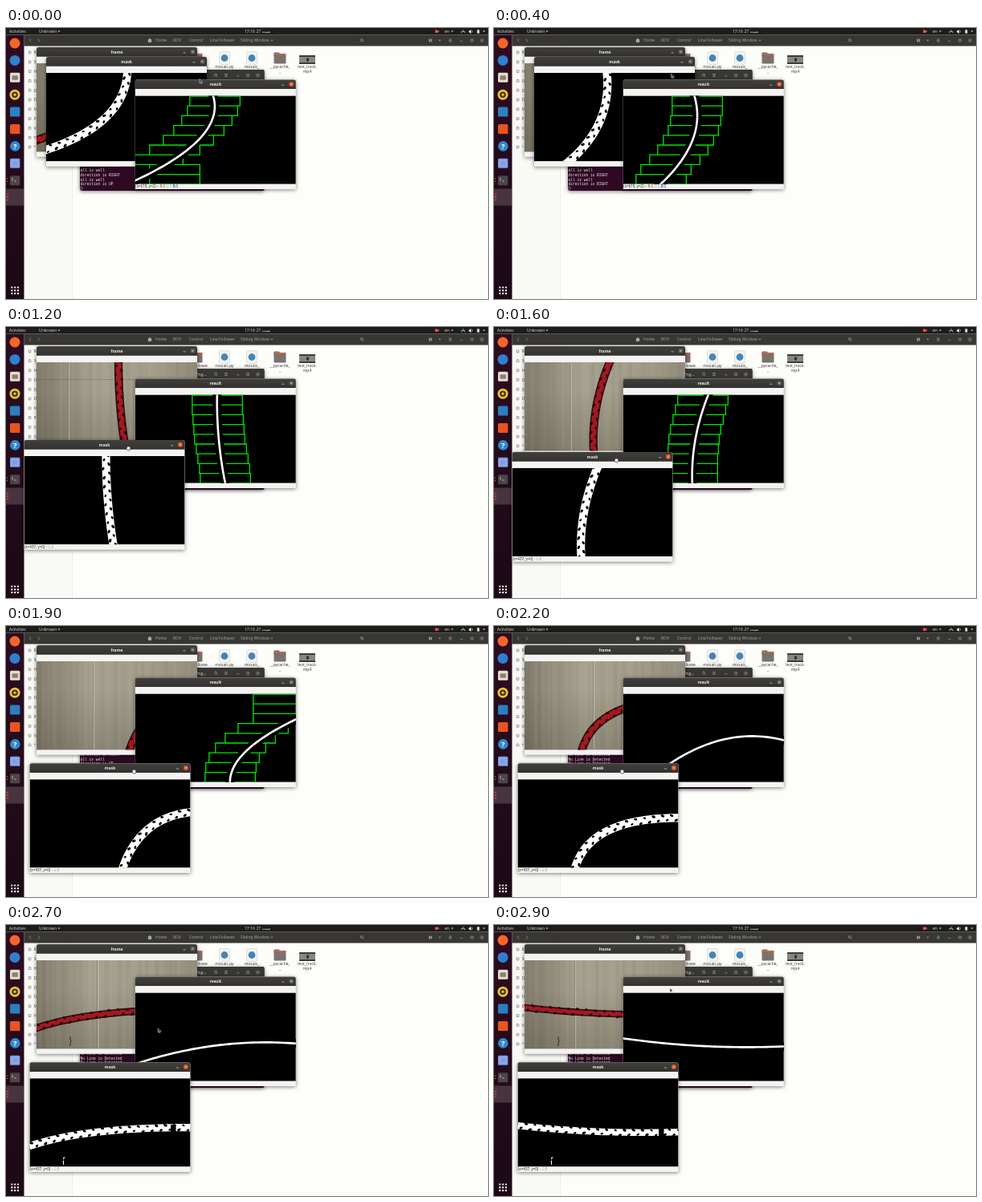
An HTML page that plays this animation: 600 by 338 pixels, repeating every 3 s.

```html
<!DOCTYPE html>
<html lang="en">
<head>
<meta charset="utf-8">
<title>Line follower</title>
<style>
html, body { margin: 0; width: 100%; height: 100%; overflow: hidden; background: #fdfefa; }
svg { display: block; }
#stage { width: 100vw; height: 100vh; }
text { font: 5px "Open Sans", "Noto Sans", sans-serif; white-space: pre; }
.mid { text-anchor: middle; }
.bar { fill: #e4e3e0; }
.dim { opacity: .65; }
.title { font-weight: 700; text-anchor: middle; fill: #eeeeec; }
.status { font: 4.5px "Noto Sans", sans-serif; fill: #222; }
.term { font: 4.57px "Liberation Mono", "DejaVu Sans Mono", monospace; fill: #f2eef0; }
.line { fill: none; stroke: #d8d7d3; stroke-width: .7; }
.shadow { filter: drop-shadow(0 1px 2.5px rgba(0,0,0,.5)); }
</style>
</head>
<body>
<svg id="stage" viewBox="0 0 600 338" preserveAspectRatio="none">
  <defs>
    <linearGradient id="dock" x2="0" y2="1"><stop stop-color="#2d0d21"/><stop offset="1" stop-color="#1b0915"/></linearGradient>
    <linearGradient id="head" x2="0" y2="1"><stop stop-color="#41403c"/><stop offset="1" stop-color="#33322f"/></linearGradient>
    <linearGradient id="wood"><stop stop-color="#817b6b"/><stop offset=".35" stop-color="#a7a18f"/><stop offset=".7" stop-color="#a39d8b"/><stop offset="1" stop-color="#918b7b"/></linearGradient>
    <linearGradient id="shade" x2="0" y2="1"><stop offset=".3" stop-color="#3a3428" stop-opacity="0"/><stop offset="1" stop-color="#3a3428" stop-opacity=".25"/></linearGradient>
  </defs>
  <g id="desk"></g>
  <g id="wins"></g>
  <g id="cursor" fill="#fff" stroke="#222" stroke-width=".7">
    <path id="hand" d="M-2 -2.2Q-1.2 -3-.6 -2.2Q.2 -3 .8 -2.2Q1.7 -2.8 2.2 -1.8L2.3 .6Q2 2.5 .3 2.6Q-1.4 2.6-2.5 .3Q-2.9 -.6-2 -.6Z"/>
    <path id="arrow" d="M0 -2.5V2.6L1.1 1.6L2 3.4L2.8 3L2 1.2H3.6Z" fill="#222" stroke="#fff" stroke-width=".5"/>
  </g>
</svg>
<script>
const LOOP = 3000, STEP = 100;
const $ = id => document.getElementById(id);
const range = n => [...Array(n).keys()];
const rect = (x, y, w, h, fill, more = '') => `<rect x="${x}" y="${y}" width="${w}" height="${h}" fill="${fill}" ${more}/>`;
const dot = (x, y, r, fill) => `<circle cx="${x}" cy="${y}" r="${r}" fill="${fill}"/>`;
const label = (x, y, s, cls = '', more = '') => `<text x="${x}" y="${y}" class="${cls}" ${more}>${s}</text>`;
const stroke = (d, more = '') => `<path d="${d}" class="line" ${more}/>`;
const minus = (x, y) => stroke(`M${x - 1.5} ${y + 1}h3`);
const cross = (x, y) => stroke(`M${x - 1.2} ${y - 1.2}l2.4 2.4m0-2.4l-2.4 2.4`);
const menu = (x, y) => stroke(`M${x - 1.7} ${y - 1.5}h3.4m-3.4 1.5h3.4m-3.4 1.5h3.4`);
const square = (x, y, more) => stroke(`M${x - 1.4} ${y - 1.4}h2.8v2.8h-2.8z`, more);
const lens = (x, y) => stroke(`M${x + .9} ${y + .9}l1.4 1.4M${x - 1.6} ${y}a1.5 1.5 0 1 0 3 0a1.5 1.5 0 1 0-3 0`);
const caret = (x, y) => `<path d="M${x - 1.4} ${y - .8}h2.8l-1.4 1.7z" class="bar"/>`;
const closer = (x, y) => dot(x, y, 2.9, '#5a5955') + cross(x, y);

function rng(seed) {
  return () => (seed = (seed * 16807) % 2147483647) / 2147483647;
}

function topBar() {
  return rect(0, 0, 600, 8.5, '#1d1c1b') +
    label(4, 6, 'Activities', 'bar') + label(41, 6, 'Unknown', 'bar') + caret(66, 4.3) +
    label(297, 6, '17:16', 'bar') + label(311.5, 6, '27', 'bar') +
    label(318.5, 6, 'سبت', 'bar', 'style="font-family:DejaVu Sans,sans-serif"') +
    rect(534, 2.4, 3.6, 3.6, '#e8524a', 'rx=".8"') + rect(537.4, 3.1, 1.6, 2.2, '#e8524a') +
    label(546, 6, 'en', 'bar') + caret(555.5, 4.3) +
    stroke('M569 2.2v2m-2 2.2v-2h4v2') +
    '<path d="M576 3.4h1.2l1.8-1.5v5l-1.8-1.5h-1.2z" class="bar"/>' + stroke('M580 3q1.2 1.4 0 2.8') +
    rect(586.5, 2.3, 2.8, 4.4, '#e4e3e0', 'rx=".5"') + caret(595, 4.3);
}

function dock() {
  const y = i => 19 + i * 21.4;
  const tile = (i, fill) => rect(5, y(i) - 6, 12.4, 12, fill, 'rx="1.5"');
  return rect(0, 8.5, 22.5, 329.5, 'url(#dock)') + rect(0, 200.5, 22, 21, '#47343f') +
    dot(11, y(0), 6.5, '#f5652a') + dot(11, y(1), 6.5, '#2f7fd0') +
    tile(2, '#e6ddcf') + rect(7.5, y(2) - 2.5, 7.4, 5.5, '#8a7f74', 'rx="1"') +
    dot(11, y(3), 6.5, '#f4c431') + dot(11, y(3), 3.8, '#39332c') + dot(11, y(3), 1.6, '#f4c431') +
    tile(4, '#2c7fc0') + tile(5, '#e95420') +
    dot(11.3, y(6), 6.3, '#2f8acb') + label(11.3, y(6) + 3.4, '?', 'mid', 'fill="#fff" style="font-size:9.5px;font-weight:700"') +
    tile(7, '#7d9ce8') + stroke(`M7.5 ${y(7) - 3.5}h7.4v7h-7.4z`, 'stroke-dasharray="1.4 1"') +
    tile(8, '#4a4647') + stroke(`M7 ${y(8) - 3}l2 1.6l-2 1.6m3 .6h3`) +
    [188, 191.5].map(cy => dot(1.6, cy, .8, '#e95420')).join('') +
    [207.5, 211, 214.5].map(cy => dot(2, cy, 1, '#ff3a2d')).join('') +
    range(9).map(i => rect(6.2 + i % 3 * 3.8, 322.4 + Math.floor(i / 3) * 3.8, 2.2, 2.2, '#f1eef0', 'rx=".6"')).join('');
}

function header() {
  let s = stroke('M31 13.5l-1.8 2l1.8 2M40 13.5l1.8 2l-1.8 2');
  s += '<path d="M176 15.5l3-2.8l3 2.8h-1v2.5h-4v-2.5z" class="bar"/>';
  [[186, 'Home'], [208, 'ROV'], [228, 'Control'], [254, 'Line Follower'], [292, 'Sliding Window']]
    .forEach(([x, name]) => s += label(x, 17.3, name, 'bar'));
  s += caret(331, 15.5) + lens(443, 15) + caret(540, 15.5) + menu(553, 15.5);
  s += rect(526.5, 13.7, 1.5, 3.6, '#e4e3e0') + rect(528.7, 13.7, 1.5, 3.6, '#e4e3e0');
  s += minus(567, 15.3) + square(580, 15.5) + closer(592.5, 15.5);
  return rect(22.5, 8.5, 577.5, 14, '#383733') + `<g class="dim">${s}</g>`;
}

function files() {
  let s = rect(22.5, 8.5, 577.5, 329.5, '#fdfefa') + rect(22.5, 22, 59.5, 316, '#f9f9f6') + rect(82, 22, .6, 316, '#dedddb');
  ['Recent', 'Starred', 'Home', 'Desktop', 'Documents', 'Downloads', 'Music', 'Pictures', 'Videos', 'Trash', '+ Other']
    .forEach((name, i) => {
      const y = 30.5 + i * 11.8;
      s += square(29.5, y, 'style="stroke:#777"') + label(34.5, y + 1.8, name, '', 'fill="#555"');
    });
  const folder = x => rect(x - 7.5, 30.5, 7, 5, '#6d6460', 'rx="1"') + rect(x - 7.5, 32, 15, 12.5, '#7b716d', 'rx="1"') +
    rect(x - 7.5, 31.8, 15, 1.2, '#e9673a');
  const page = x => rect(x - 6.5, 29.5, 13, 16, '#f3f3f1', 'rx="1" stroke="#cfcfcb" stroke-width=".6"') + dot(x, 37.5, 4.4, '#4584b6');
  const clip = x => rect(x - 10, 34, 20, 11, '#3c3d3b') + rect(x - 10, 36, 20, 7, '#858880') + rect(x - 1, 37.5, 3, 4, '#33302e');
  [[237, folder, 'line_followe'], [272, page, 'mosaic.py'], [306, page, 'mosaic_'], [341, folder, '__pycache_', '_'], [375, clip, 'test_track.', 'mp4']]
    .forEach(([x, icon, ...names]) => {
      s += icon(x) + names.map((name, i) => label(x, 50 + i * 6, name, 'mid', 'fill="#333"')).join('');
    });
  return s + header();
}

function terminal() {
  return `<g class="shadow">${rect(92, 52, 229.5, 151, '#300a24', 'rx="2"')}</g>` + rect(92, 52, 229.5, 13.5, '#383733', 'rx="2"') +
    '<g class="dim">' + label(249.5, 60.8, 'Sliding Window/ng...', 'bar', 'text-anchor="end" style="font-weight:700"') +
    lens(261, 58.5) + menu(274, 59) + minus(289, 58.8) + square(301, 59) + closer(313.5, 59) + '</g>' +
    range(7).map(i => label(92.5, 196.2 - i * 5.7, '', 'term', `id="row${i}"`)).join('') +
    rect(92.8, 198, 2.2, 4, 'none', 'stroke="#ddd" stroke-width=".4"');
}

function win(id, inner) {
  return `<g id="${id}"><path d="M0 136.7V2.5Q0 0 2.5 0H197.5Q200 0 200 2.5V136.7Z" fill="#f4f3f2" class="shadow"/>
    <path d="M0 11.7V2.5Q0 0 2.5 0H197.5Q200 0 200 2.5V11.7Z" fill="url(#head)"/>
    ${label(100, 7.6, id, 'title')}${minus(184, 5.8)}<circle id="${id}X" cx="194.4" cy="5.7" r="2.9" fill="#5a5955"/>${cross(194.4, 5.7)}
    <svg y="20" width="200" height="110.3" viewBox="0 0 200 110.3">${rect(0, 0, 200, 110.3, '#000')}${inner}</svg>
    <text id="${id}S" x=".5" y="135" class="status"></text></g>`;
}

function planks() {
  const rnd = rng(77);
  const grain = range(46).map(i => rect(-100 + i * 7 + rnd() * 6, -10, 1 + rnd() * 5, 140,
    rnd() < .5 ? '#d6cfc0' : '#5f594d', `opacity="${(.03 + rnd() * .05).toFixed(2)}"`)).join('');
  return rect(0, 0, 200, 111, 'url(#wood)') + rect(0, 0, 200, 111, 'url(#shade)') +
    `<g id="grain">${grain}${rect(0, -10, .8, 140, '#5a5347', 'opacity=".5"')}${rect(.8, -10, 1.4, 140, '#d8d2c2', 'opacity=".5"')}</g>` +
    rect(0, 0, 200, .8, '#5a5347', 'id="joint" opacity=".45"');
}

const pathTag = (id, color, w = 0) => `<path id="${id}" fill="none" stroke="${color}" stroke-width="${w}"/>`;
$('desk').innerHTML = files() + dock() + topBar() + terminal();
$('wins').innerHTML =
  win('frame', planks() + pathTag('edge', '#2a0d0f') + pathTag('tape', '#a51820') + '<path id="marks" fill="#1c080a"/>' +
    '<path id="scrap" d="M42 95v4m1 0l-1.5 8" stroke="#2b2722" fill="none"/>') +
  win('mask', pathTag('blob', '#fff') + '<path id="holes" fill="#000"/>' +
    rect(175.5, 58, 6.5, 20, '#000', 'id="gap"') + '<path id="speck" d="M43 98l-1 3m0 1.5v5" stroke="#fff" stroke-width="1.2"/>') +
  win('result', pathTag('boxes', '#00e800', 1.3) + pathTag('clear', '#000', 11) + pathTag('fit', '#fff', 2.6));

// Linear keyframes: rows are [time, ...values]
function key(t, rows) {
  let i = 0;
  while (i < rows.length - 2 && t >= rows[i + 1][0]) i++;
  const [a, b] = [rows[i], rows[i + 1]];
  const u = Math.min(1, Math.max(0, (t - a[0]) / (b[0] - a[0])));
  return a.slice(1).map((v, n) => v + (b[n + 1] - v) * u);
}

// Tape as a quadratic Bezier: start, control and end point
const tape = [
  [0, 101, 0, 97, 64, 0, 96],
  [800, 80, 0, 96, 55, 103, 110],
  [1200, 102, 0, 102, 55, 111, 110],
  [1600, 106, 0, 83, 55, 86, 110],
  [1900, 200, 41, 138, 48, 116, 110],
  [2400, 200, 53, 59, 48, 42, 110],
  [2900, 200, 67, 100, 70, 0, 59]];

// Fitted parabola: x at top, middle and bottom; once the tape lies flat, y at left, middle and right
const steep = [[0, 97, 79, -9], [800, 80, 94, 103], [1200, 102, 104, 112], [1600, 106, 90, 86], [1900, 281, 159, 118], [2200, 330, 150, 85]];
const flat = [[2400, 137, 65, 58], [2900, 57, 66.6, 67]];

const maskAt = [[600, 50, 36], [800, 38, 83], [1200, 22.5, 141], [1600, 22.5, 156], [1900, 29.5, 171.2]];
const seam = [[0, 25], [1200, 39], [1900, 70], [2400, 95], [2900, 62]];

const parabola = ([a, m, b], u) => a * (1 - u) * (1 - 2 * u) + 4 * m * u * (1 - u) + b * u * (2 * u - 1);
const bezier = (a, c, b, u) => a * (1 - u) ** 2 + 2 * c * u * (1 - u) + b * u * u;
const toPath = pts => 'M' + pts.map(p => p.map(v => v.toFixed(2)).join(' ')).join('L');

// Dark marks alternating between the two edges of the tape
function spots(pts, phase, size) {
  const rnd = rng(4321);
  let d = '', next = phase, run = 0, side = 1;
  for (let i = 1; i < pts.length; i++) {
    const [x0, y0] = pts[i - 1], dx = pts[i][0] - x0, dy = pts[i][1] - y0, len = Math.hypot(dx, dy);
    while (len && run + len >= next) {
      const u = (next - run) / len, off = side * (2.4 + rnd() * 1.5);
      const x = x0 + dx * u - dy / len * off, y = y0 + dy * u + dx / len * off;
      const r = size * (.8 + rnd() * .4), turn = Math.atan2(dy, dx) + side * .5;
      const ax = r * Math.cos(turn), ay = r * Math.sin(turn);
      const arc = `A${r} ${r * .65} ${turn * 180 / Math.PI} 1 0 `;
      d += `M${x - ax} ${y - ay}${arc}${x + ax} ${y + ay}${arc}${x - ax} ${y - ay}Z`;
      next += 5.6;
      side = -side;
    }
    run += len;
  }
  return d;
}

const set = (id, name, v) => $(id).setAttribute(name, v);
const show = (id, on) => set(id, 'visibility', on ? 'visible' : 'hidden');
const move = (id, [x, y]) => set(id, 'transform', `translate(${x} ${y})`);
move('frame', [38, 24]);
move('result', [160.8, 64.4]);

function drawTape(t) {
  const [ax, ay, cx, cy, bx, by] = key(t, tape);
  const pts = range(61).map(i => i / 30 - .5).map(u => [bezier(ax, cx, bx, u), bezier(ay, cy, by, u)]);
  const w = key(t, [[2400, 10.2], [2900, 8.4]])[0], phase = 4 + t * .037 % 11.2;
  [['edge', w + .2], ['tape', w - 3], ['blob', w]].forEach(([id, width]) => {
    set(id, 'd', toPath(pts));
    set(id, 'stroke-width', width);
  });
  set('holes', 'd', spots(pts, phase, 2.1));
  set('marks', 'd', spots(pts, phase, 2));
  move('grain', [key(t, seam)[0], 0]);
  set('joint', 'y', 246 - .1875 * t);
  ['scrap', 'gap', 'speck'].forEach(id => show(id, t >= 2700));
}

function drawFit(t) {
  const isFlat = t >= 2200, h = 12.2;
  const q = key(t, isFlat ? flat : steep);
  const pts = range(56).map(i => i / 50 - .05).map(u => isFlat ? [u * 200, parabola(q, u)] : [parabola(q, u), u * 110]);
  set('fit', 'd', toPath(pts));
  set('clear', 'd', toPath(pts));
  // Each search window sits where the one below it met the curve; a lost one falls back
  const boxes = range(9).map(i => {
    const x = parabola(q, Math.min(1, (i + 1.5) * h / 110));
    return `M${Math.round(x < 20 ? 49 : Math.min(x, 178)) - 31} ${.6 + i * h}h62.5v${h}h-62.5z`;
  });
  set('boxes', 'd', isFlat ? '' : boxes.join(''));
}

function drawTerm(t) {
  range(7).forEach(i => {
    const way = (t / STEP + i / 2) % 3 ? 'RIGHT' : 'UP';
    $('row' + i).textContent = t >= 2200 ? 'No Line is Detected' : i % 2 ? 'all is well' : 'direction is ' + way;
  });
}

const tint = (color, s) => `<tspan fill="${color}">${s}</tspan>`;
function draw(t) {
  drawTape(t);
  drawFit(t);
  drawTerm(t);
  const focused = t >= 700, held = focused && t < 2400;
  const [x, y] = key(t, maskAt);
  const grip = [x + 130, y + 10.5];
  move('mask', [x, y]);
  move('cursor', focused ? key(t, [[2500, ...grip], [2900, 219, 81]]) : key(t, [[300, 241, 66], [600, ...grip]]));
  show('hand', held);
  show('arrow', !held);
  $('wins').append(...(focused ? ['result', 'mask'] : ['mask', 'result']).map($));
  set('maskX', 'fill', focused ? '#e95420' : '#5a5955');
  set('resultX', 'fill', focused ? '#5a5955' : '#e95420');
  $('maskS').innerHTML = t >= 600 ? '(x=437, y=0) ' + tint('#999', '~ L:0') : '';
  $('resultS').innerHTML = focused ? '' : `(x=619, y=2) ~ ${tint('#d22', 'R:0')} ${tint('#8b8', 'G:0')} ${tint('#22d', 'B:0')}`;
}

let last = -1;
function tick() {
  const t = Math.floor(performance.now() % LOOP / STEP) * STEP;
  if (t !== last) draw(last = t);
  requestAnimationFrame(tick);
}
tick();
</script>
</body>
</html>
```
